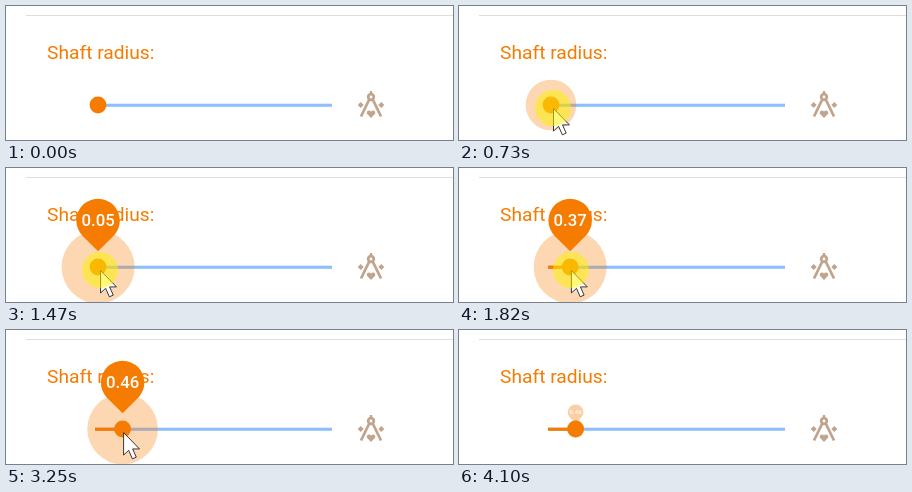
These frames come from a looping animation (447 px wide and 134 px high, 4.13 s). An HTML page:

```html
<!DOCTYPE html>
<html lang="en">
<head>
<meta charset="utf-8">
<title>Shaft radius slider</title>
<style>
  html, body { margin: 0; width: 100%; height: 100%; overflow: hidden; background: #fff; }
  svg { display: block; width: 447px; height: 134px; }
  text { font-family: Roboto, sans-serif; }
  .orange { fill: #f57c00; }
  .title { font-size: 19.2px; }
  .value { font-size: 16.8px; font-weight: 500; fill: #fff; text-anchor: middle; }
  .icon { fill: #c0a48c; }
  .icon .line { fill: none; stroke: #c0a48c; stroke-width: 2.8; }
</style>
</head>
<body>
<svg viewBox="0 0 447 134">
  <rect x="20" y="9" width="427" height="1" fill="#dedede"/>
  <text class="title orange" x="41.1" y="53">Shaft radius:</text>

  <g class="icon" transform="translate(365 99)">
    <circle class="line" cy="-8" r="2.8"/>
    <path d="M-1.2-14h2.4v4h-2.4z"/>
    <path class="line" d="M-2-5L-10 11.5M2-5L10 11.5"/>
    <path id="gem" d="M-10.3-3l3 3-3 3-3-3z"/>
    <use href="#gem" x="20.6"/>
    <path d="M0 13l-4.3-4.4q0-3 2.3-3 1.4 0 2 1.2.6-1.2 2-1.2 2.3 0 2.3 3z"/>
  </g>

  <rect x="89" y="97.7" width="237" height="3.1" fill="#8cbffc"/>
  <rect id="fill" class="orange" x="89" y="97.7" height="3.1"/>
  <g id="thumb">
    <circle id="halo" class="orange" opacity=".3"/>
    <circle class="orange" r="8.4"/>
    <g id="pin">
      <path class="orange" d="M0-15.75L-15.38-31.12A21.75 21.75 0 1 1 15.38-31.12Z"/>
      <text id="value" class="value" y="-40.8"></text>
    </g>
  </g>
  <g id="cursor">
    <path d="M.5.5V23L5.6 18.3 9.3 26.8 13.2 25.1 9.5 16.9H16.4Z"
          fill="#fff" stroke="#222" stroke-width=".9" stroke-linejoin="round"/>
    <circle id="press" r="18" fill="#fff200" opacity=".52"/>
  </g>
</svg>
<script>
const LOOP = 4130, FADE = 400;
const ENTER = 300, PRESS = 712, DRAG = 1470, RELEASE = 3240, BLUR = 4015;
const DRAG_TIME = 630, LEAVE_TIME = 280;
const HOVER_R = 23.3, PRESS_R = 36.5;
const el = id => document.getElementById(id);
const [fill, thumb, halo, pin, value, cursor, press] =
  ['fill', 'thumb', 'halo', 'pin', 'value', 'cursor', 'press'].map(el);

const clamp = x => Math.min(1, Math.max(0, x));

// cubic-bezier(.25, .8, .25, 1), solved by bisection
function ease(x) {
  if (x <= 0 || x >= 1) return clamp(x);
  let lo = 0, hi = 1, u;
  for (let i = 0; i < 24; i++) {
    u = (lo + hi) / 2;
    if (.75 * u * (1 - u) + u ** 3 < x) lo = u; else hi = u;
  }
  return 2.4 * u * (1 - u) ** 2 + 3 * u * u * (1 - u) + u ** 3;
}

const since = (t, start) => ease((t - start) / FADE);

function draw(t) {
  const enter = since(t, ENTER);
  const drag = 1 - (1 - clamp((t - DRAG) / DRAG_TIME)) ** 1.85;
  const leave = clamp((t - RELEASE) / LEAVE_TIME) ** 2;
  const pressed = since(t, PRESS), blurred = since(t, BLUR);

  const shift = 24.6 * drag;
  const scale = pressed - blurred;
  const radius = HOVER_R * (enter - blurred) + (PRESS_R - HOVER_R) * (pressed - since(t, RELEASE));

  thumb.setAttribute('transform', `translate(${92 + shift} 99)`);
  fill.setAttribute('width', 3 + shift);
  halo.setAttribute('r', Math.max(0, radius));
  pin.setAttribute('transform', `scale(${scale})`);
  pin.setAttribute('opacity', scale);
  value.textContent = (.05 + shift / 60).toFixed(2);

  const x = 103 - 9 * enter + 23 * drag + 66 * leave;
  const y = 135 - 33 * enter + 34 * leave;
  cursor.setAttribute('transform', `translate(${x} ${y})`);
  cursor.style.display = enter > 0 && leave < 1 ? '' : 'none';
  press.style.display = t >= PRESS && t < RELEASE ? '' : 'none';
}

function tick() {
  draw(performance.now() % LOOP);
  requestAnimationFrame(tick);
}
tick();
</script>
</body>
</html>
```
